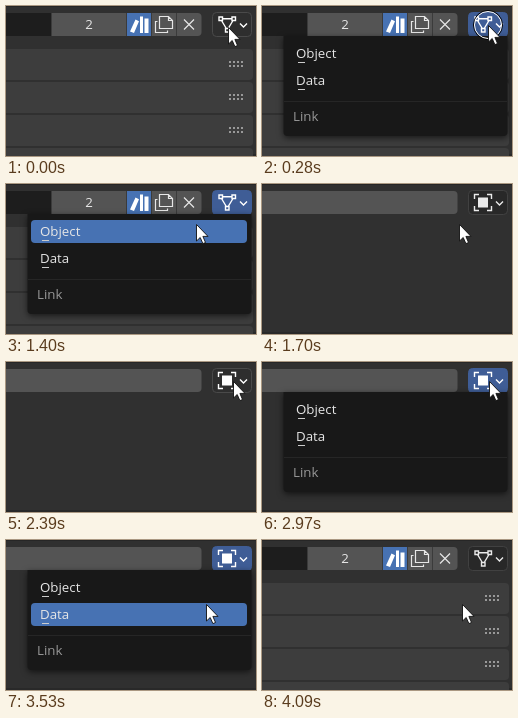
These frames come from a looping animation (250x150 px, 4240 ms). An HTML page:

```html
<!DOCTYPE html>
<html lang="en">
<head>
<meta charset="utf-8">
<title>Filter menu</title>
<style>
  html, body { margin: 0; width: 100%; height: 100%; overflow: hidden; background: #303030; }
  svg { display: block; width: 250px; height: 150px; }
  text { font: 13.3px "Open Sans", "Noto Sans", sans-serif; fill: #e6e6e6; }
  .line { fill: none; stroke: #e6e6e6; stroke-width: 1.2; }
  #menu { filter: drop-shadow(0 2px 3px #0009); }
  #button { fill: #282828; stroke: #414141; }
  #icons { opacity: .9; }
  #icons .line { stroke: #fff; stroke-width: 1.4; }
  .hover #button { fill: #2e2e2e; stroke: #4a4a4a; }
  .hover #icons, .open #icons { opacity: 1; }
  .open #button { fill: #3f5d96; stroke: #3f5d96; }
</style>
</head>
<body>
<svg id="stage" viewBox="0 0 250 150">
  <rect width="250" height="150" fill="#303030"/>
  <rect width="250" height="1" fill="#262626"/>
  <rect y="148" width="250" height="2" fill="#292929"/>

  <g id="dataView">
    <g id="panels"></g>
    <rect y="7" width="45" height="23" fill="#1d1d1d"/>
    <path d="M46 7H191.500a4 4 0 0 1 4 4V26a4 4 0 0 1-4 4H46z" fill="#545454"/>
    <rect x="121" y="7" width="24" height="23" fill="#4772b3"/>
    <path d="M45.500 7v23M120.500 7v23M145.500 7v23M170.500 7v23" stroke="#3b3b3b"/>
    <text x="83" y="23" text-anchor="middle">2</text>
    <path d="M129.500 13.500l3.500 1.800-5 11.700-4-1.500zM134 10.500h3V27h-3zM138.500 12.500h4V27h-4z" fill="#fff"/>
    <path class="line" d="M153.500 10.500h9l4 4v8h-13zM162.500 10.500v4h4M151.500 15.500h-2v11h12v-2"/>
    <path class="line" d="M178 13.500l10 10M188 13.500l-10 10"/>
  </g>
  <path id="objectView" d="M0 7H191.500a4 4 0 0 1 4 4V26a4 4 0 0 1-4 4H0z" fill="#545454"/>

  <rect id="button" x="206.500" y="6.500" width="39" height="24" rx="4"/>
  <g id="icons">
    <path class="line" d="M234 17.500l3.500 3.500 3.500-3.500"/>
    <path id="meshIcon" class="line" d="M213 11h3.500v3.500h-3.500zM226 11h3.500v3.500h-3.500zM219.500 22.500h3.500v3.500h-3.500zM216.500 12.800h9.500M215.500 14.500l4.800 8M227 14.500l-4.800 8"/>
    <g id="objectIcon">
      <path class="line" d="M212.500 15v-4.500h4.500M225 10.500h4.500V15M229.500 22v4.500H225M217 26.500h-4.500V22"/>
      <rect x="216" y="13.500" width="10" height="10" fill="#fff"/>
    </g>
  </g>

  <g id="menu">
    <path d="M21.500 30H245.500V126a4 4 0 0 1-4 4H25.500a4 4 0 0 1-4-4z" fill="#181818"/>
    <path d="M22 95.500H245" stroke="#262626"/>
    <rect id="mark" x="25" width="216" height="23" rx="4" fill="#4772b3"/>
    <text x="34" y="52">Object</text>
    <text x="34" y="79">Data</text>
    <path d="M36 56.500h7M36 83.500h7" stroke="#ccc"/>
    <text x="31" y="115" style="fill:#989898">Link</text>
  </g>

  <g id="pointer">
    <g id="ring" fill="none">
      <circle r="14.500" stroke="#000"/>
      <circle r="13.500" stroke="#fff"/>
    </g>
    <path d="M.5.5V17L4.200 13.500 6.900 19.600 9.500 18.500 6.900 12.400H12z" fill="#fff" stroke="#111" stroke-width=".9"/>
  </g>
</svg>
<script>
const LOOP = 4240;
const el = id => document.getElementById(id);
const show = (id, on) => el(id).style.display = on ? "" : "none";

// Pointer stops: time, x, y
const stops = [
  [0, 222, 21], [130, 226, 19], [560, 224, 21], [710, 198, 30], [840, 190, 37],
  [990, 190, 40], [1700, 197, 40], [1830, 206, 39], [1980, 217, 33], [2110, 225, 24],
  [2260, 226, 21], [2390, 227, 19], [3100, 219, 25], [3250, 206, 45], [3380, 200, 61],
  [3530, 200, 64]
];
const clicks = [[280, 410], [1270, 1400], [3810, 3960]];
const menus = [[280, 1550], [2970, 4090]];
const rows = [36, 63];

let panels = "";
for (let y = 43; y < 150; y += 33) {
  panels += `<path d="M0 ${y}H243a4 4 0 0 1 4 4v23a4 4 0 0 1-4 4H0z" fill="#3d3d3d"/>`;
  for (let i = 0; i < 8; i++)
    panels += `<rect x="${223 + i % 4 * 4}" y="${y + 12 + (i >> 2) * 4}" width="2" height="2" fill="#999"/>`;
}
el("panels").innerHTML = panels;

function draw(now) {
  const t = now % LOOP;
  const during = spans => spans.some(([from, to]) => t >= from && t < to);
  const [, x, y] = stops.findLast(s => s[0] <= t);
  const open = during(menus);
  const objectMode = t >= 1550 && t < 4090;
  const row = rows.find(top => y >= top && y < top + 23);

  show("dataView", !objectMode);
  show("meshIcon", !objectMode);
  show("objectView", objectMode);
  show("objectIcon", objectMode);
  show("menu", open);
  show("mark", row);
  if (row) el("mark").setAttribute("y", row);
  show("ring", during(clicks));
  el("pointer").setAttribute("transform", `translate(${x} ${y})`);
  el("stage").classList.toggle("open", open);
  el("stage").classList.toggle("hover", !open && x > 206 && y < 31);
}

const start = performance.now();
function tick() {
  draw(performance.now() - start);
  requestAnimationFrame(tick);
}
tick();
</script>
</body>
</html>
```
